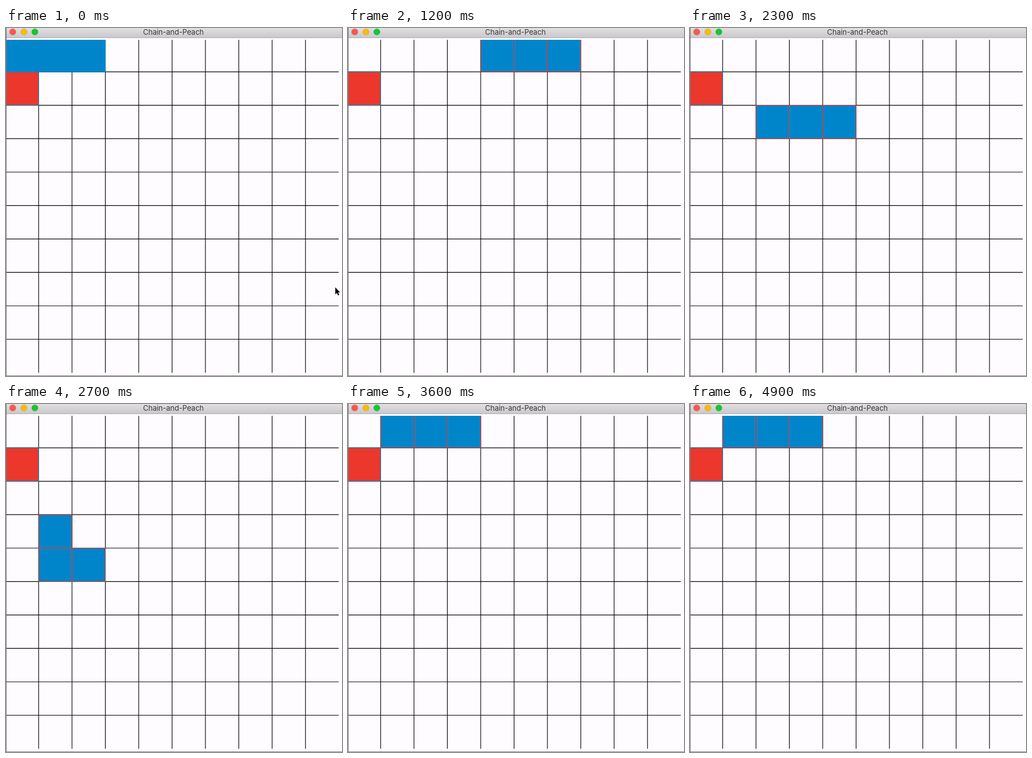
Animation of 600 by 620 pixels, one loop 5 s. Source, as an HTML page with a canvas:

```html
<!DOCTYPE html>
<html lang="en">
<head>
<meta charset="utf-8">
<title>Chain-and-Peach</title>
<style>
  html, body { margin: 0; width: 600px; height: 620px; overflow: hidden; }
  canvas { display: block; }
</style>
</head>
<body>
<canvas id="stage" width="600" height="620"></canvas>
<script>
const ctx = document.getElementById('stage').getContext('2d');
const LOOP = 5000, TICK = 100, CELLS = 10, LENGTH = 3;
const CELL = 59.56, LINE_WIDTH = 1.15;
const BLUE = '#0085ca', RED = '#ec372c', BLACK = '#000';

// The board in window pixels; its outer rim is clipped away.
const BOARD = { x: -1.25, y: 18.5, left: 1, top: 21, right: 594.5, bottom: 614.5 };
const colX = c => BOARD.x + CELL * c;
const rowY = r => BOARD.y + CELL * r;

// Every cell the snake visits, in order.
const route = [[0, 0], [1, 0], [2, 0]];
const moves = { R: [1, 0], L: [-1, 0], U: [0, -1], D: [0, 1] };
for (const leg of 'R6 D2 L7 D2 R3 U4 L3 D4 R2 U4 L2'.split(' ')) {
  const [dx, dy] = moves[leg[0]];
  for (let i = 0; i < +leg[1]; i++) {
    const [x, y] = route[route.length - 1];
    route.push([x + dx, y + dy]);
  }
}

// The snake waits at first, then moves every tick except two.
const movesMade = tick => tick < 9 ? 0 : tick - 8 - (tick > 16) - (tick > 39);

function rect(x, y, w, h, color) {
  ctx.fillStyle = color;
  ctx.fillRect(x, y, w, h);
}

function line(x1, y1, x2, y2) {
  ctx.beginPath();
  ctx.moveTo(x1, y1);
  ctx.lineTo(x2, y2);
  ctx.stroke();
}

function cell([c, r], fill, outline) {
  ctx.strokeStyle = outline;
  rect(colX(c), rowY(r), CELL, CELL, fill);
  ctx.strokeRect(colX(c), rowY(r), CELL, CELL);
}

function drawWindow() {
  rect(0, 0, 600, 620, '#fefcff');
  const bar = ctx.createLinearGradient(0, 0, 0, 17);
  bar.addColorStop(0, '#e1dfe1');
  bar.addColorStop(1, '#cac8ca');
  rect(0, 0, 600, 17, bar);
  rect(0, 17, 600, 1, '#b3b1b3');
  rect(0, 0, 1, 620, '#777577');
  rect(0, 619, 600, 1, '#868486');

  ctx.lineWidth = .8;
  ctx.strokeStyle = 'rgba(0, 0, 0, .12)';
  for (const [x, color] of [[12, '#fc5650'], [32, '#fdb90c'], [51.5, '#16c732']]) {
    ctx.fillStyle = color;
    ctx.beginPath();
    ctx.arc(x, 7, 5.8, 0, 7);
    ctx.fill();
    ctx.stroke();
  }

  ctx.fillStyle = '#383638';
  ctx.font = '13px Inter, sans-serif';
  ctx.textAlign = 'center';
  ctx.fillText('Chain-and-Peach', 299, 12);
}

function drawBoard(made) {
  const { left, top, right, bottom } = BOARD;
  ctx.save();
  ctx.beginPath();
  ctx.rect(left, top, right - left, bottom - top);
  ctx.clip();
  ctx.lineWidth = LINE_WIDTH;
  ctx.strokeStyle = BLACK;
  for (let i = 1; i < CELLS; i++) {
    line(colX(i), top, colX(i), bottom);
    line(left, rowY(i), right, rowY(i));
  }
  cell([0, 1], RED, BLUE);
  for (const pos of route.slice(made, made + LENGTH)) cell(pos, BLUE, made ? RED : BLUE);
  ctx.restore();
}

function drawPointer() {
  ctx.fillStyle = BLACK;
  ctx.strokeStyle = '#fff';
  ctx.lineWidth = 2;
  ctx.beginPath();
  [[588, 462], [588, 474.5], [591, 472], [593, 476.5], [595, 475.5], [593, 471], [596.5, 471]]
    .forEach(([x, y]) => ctx.lineTo(x, y));
  ctx.closePath();
  ctx.stroke();
  ctx.fill();
}

function draw(now) {
  const tick = Math.floor(now % LOOP / TICK);
  drawWindow();
  drawBoard(movesMade(tick));
  if (tick === 0) drawPointer();
  requestAnimationFrame(draw);
}

requestAnimationFrame(draw);
</script>
</body>
</html>
```
